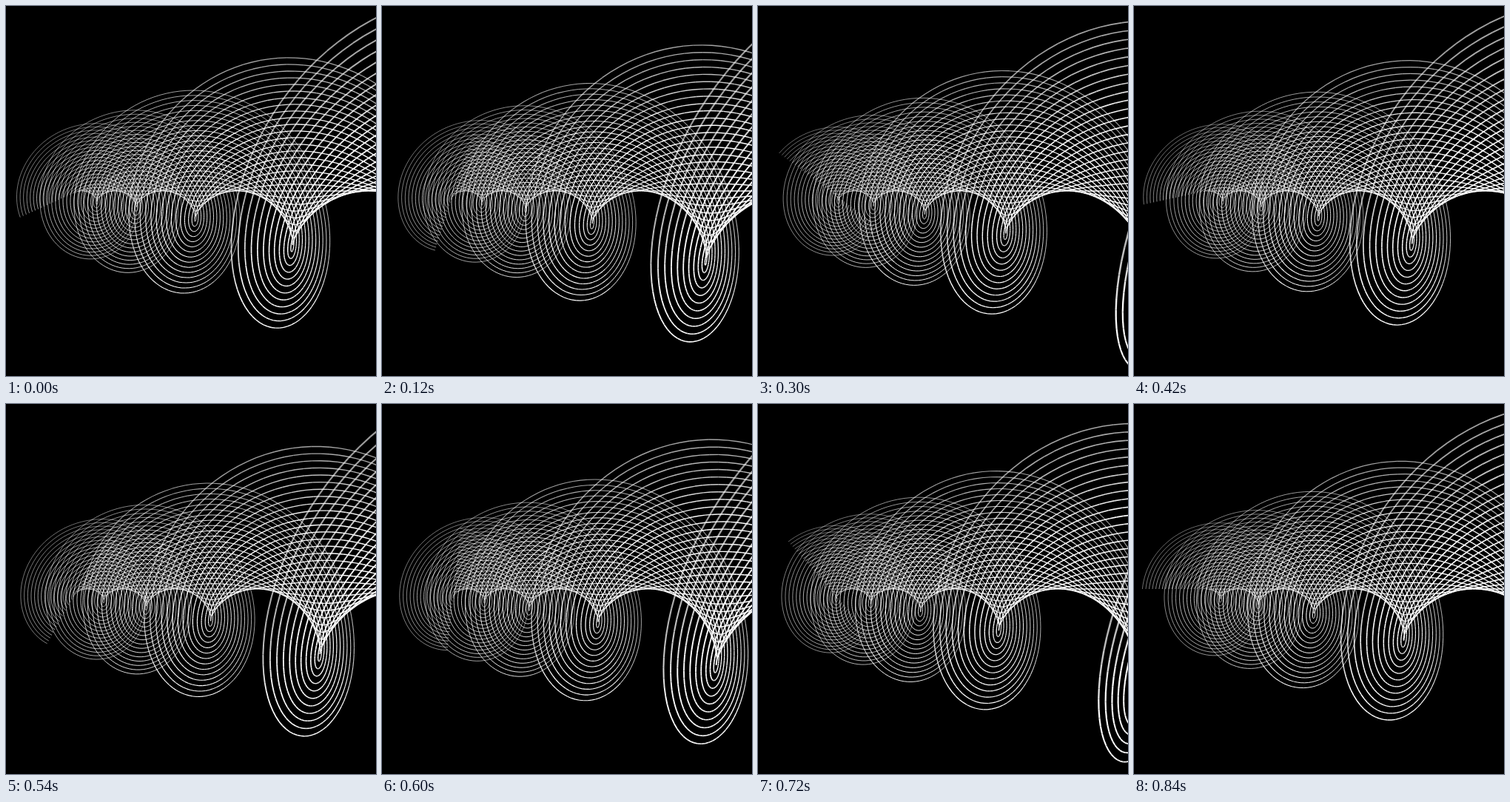
An HTML page with a canvas that plays this animation: 500 px wide and 500 px high, repeating every 0.9 s.

```html
<!DOCTYPE html>
<html lang="en">
<head>
<meta charset="utf-8">
<title>Receding helicoid</title>
<style>
  html, body { margin: 0; width: 100%; height: 100%; overflow: hidden; background: #000; }
  canvas { display: block; width: 500px; height: 500px; }
</style>
</head>
<body>
<canvas id="stage" width="500" height="500"></canvas>
<script>
const ctx = document.getElementById('stage').getContext('2d');

const STEP_MS = 60, STEPS = 15;
const FOCAL = 690.7, TILT = Math.PI / 6;
const RADIUS = 0.8035;            // half length of the rotating rod
const NEAR = 1.85, FAR = 6.716;   // depth range of the axis; half a turn per unit
const STRANDS = 20;               // on each side of the axis
const SEGMENTS = 250;
const LINE = 4, DENSITY = 300;

// Perspective view of the point at `offset` along the rod at axis depth z.
function project(z, offset, phase) {
  const angle = Math.PI * (z - FAR + phase);
  const side = offset * Math.cos(angle);
  const depth = z - side * Math.sin(TILT);
  const scale = FOCAL / depth;
  return {
    x: 250 + scale * (2.392 - z * Math.tan(TILT) - side * Math.cos(TILT)),
    y: 250 + scale * offset * Math.sin(angle),
    depth
  };
}

// Fast parts of a strand are fainter, near parts are thicker.
function drawStrand(offset, phase) {
  const dz = (FAR - NEAR) / SEGMENTS;
  let a = project(FAR, offset, phase);
  for (let i = 1; i <= SEGMENTS; i++) {
    const b = project(FAR - i * dz, offset, phase);
    if (Math.min(a.x, b.x) < 505) {
      const speed = Math.hypot(b.x - a.x, b.y - a.y) / dz;
      ctx.lineWidth = LINE / b.depth;
      ctx.globalAlpha = Math.min(1, DENSITY * ctx.lineWidth / speed);
      ctx.beginPath();
      ctx.moveTo(a.x, a.y);
      ctx.lineTo(b.x, b.y);
      ctx.stroke();
    }
    a = b;
  }
}

function draw(step) {
  ctx.globalAlpha = 1;
  ctx.fillStyle = '#000';
  ctx.fillRect(0, 0, 500, 500);
  ctx.strokeStyle = '#fff';
  const phase = 2 * (step + 1) / STEPS;
  for (let i = -STRANDS; i <= STRANDS; i++) {
    drawStrand(RADIUS * i / STRANDS, phase);
  }
}

let start, shown;
function tick(now) {
  start ??= now;
  const step = Math.floor((now - start) / STEP_MS) % STEPS;
  if (step !== shown) draw(shown = step);
  requestAnimationFrame(tick);
}
requestAnimationFrame(tick);
</script>
</body>
</html>
```
